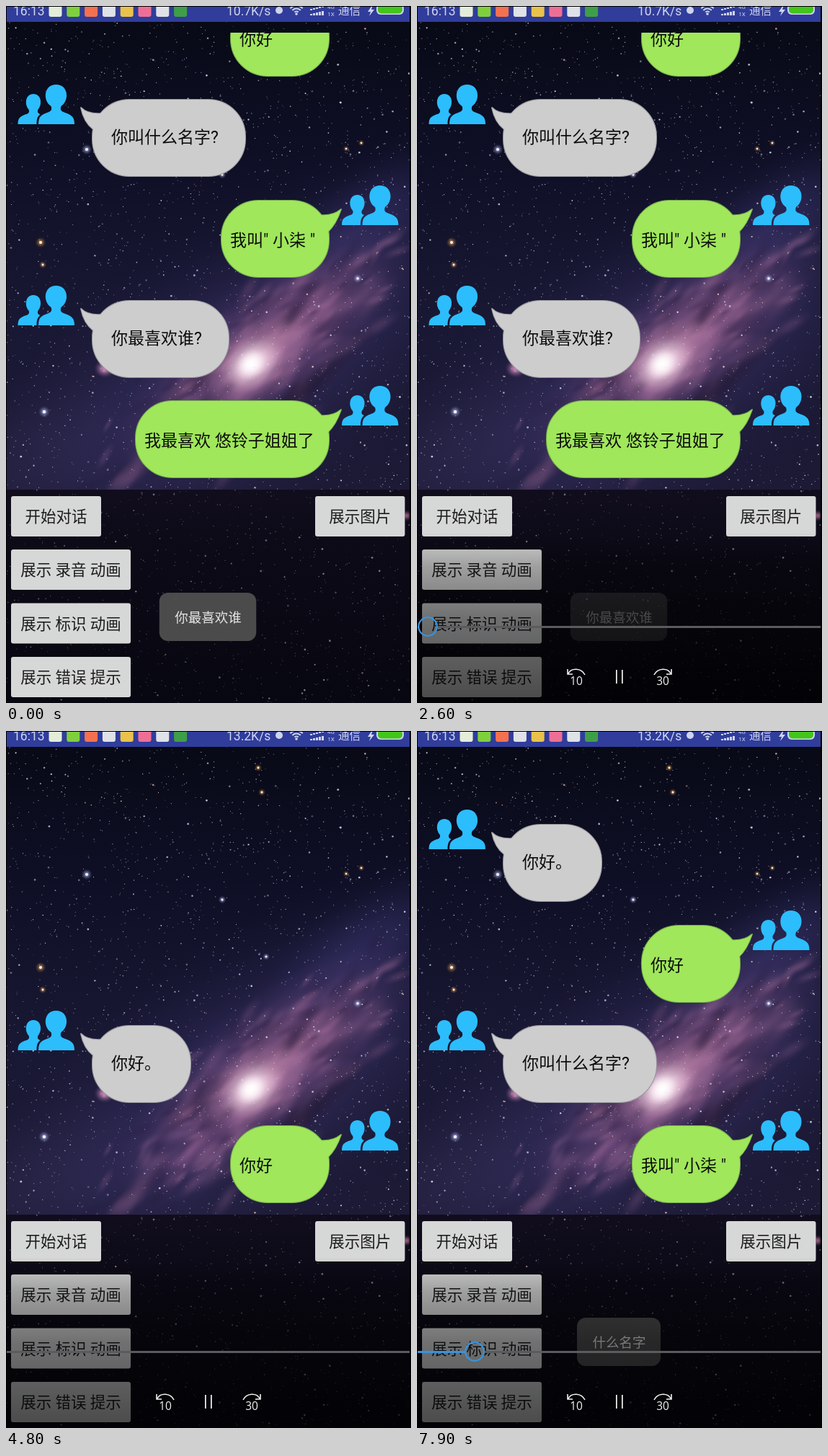
Recreate the animation shown at these times as an HTML page with a canvas. Size 562 px wide and 967 px high, loop 8 s.

```html
<!DOCTYPE html>
<html lang="zh">
<head>
<meta charset="utf-8">
<style>
html, body { margin: 0; width: 100%; height: 100%; overflow: hidden; background: #000; }
canvas { display: block; width: 100vw; height: 100vh; }
</style>
</head>
<body>
<canvas id="stage" width="562" height="967"></canvas>
<script>
const W = 562, H = 967, LOOP = 8000, ROW = 139.25;
const FONT = 'Roboto, "Noto Sans CJK SC", "Noto Sans CJK", sans-serif';
const BLUE = '#3793de', SKY = '#2cbdfd';
const stage = document.getElementById('stage').getContext('2d');
let c = stage;

const clamp = v => Math.max(0, Math.min(1, v));
const ramp = (t, from, to) => clamp((t - from) / (to - from));

function rect(x, y, w, h, color) { c.fillStyle = color; c.fillRect(x, y, w, h); }
function box(x, y, w, h, r, color) {
  c.fillStyle = color; c.beginPath(); c.roundRect(x, y, w, h, r); c.fill();
}
function dot(x, y, r, color, ry = r) {
  c.fillStyle = color; c.beginPath(); c.ellipse(x, y, r, ry, 0, 0, 7); c.fill();
}
function text(s, x, y, size, color, align = 'center', font = FONT) {
  c.font = size + 'px ' + font; c.textAlign = align; c.textBaseline = 'alphabetic';
  c.fillStyle = color; c.fillText(s, x, y + size * 0.37);
}
function linear(y0, y1, stops) {
  const g = c.createLinearGradient(0, y0, 0, y1);
  stops.forEach(([at, color]) => g.addColorStop(at, color));
  return g;
}
function glow(x, y, rx, ry, angle, rgb, alpha) {
  c.save();
  c.translate(x, y); c.rotate(angle * Math.PI / 180); c.scale(rx, ry);
  const g = c.createRadialGradient(0, 0, 0, 0, 0, 1);
  [[0, 1], [.3, .75], [.6, .32], [.82, .09], [1, 0]]
    .forEach(([at, k]) => g.addColorStop(at, `rgba(${rgb},${alpha * k})`));
  c.fillStyle = g; c.fillRect(-1, -1, 2, 2);
  c.restore();
}

function paintSky() {
  let seed = 41;
  const rnd = () => (seed = seed * 16807 % 2147483647) / 2147483647;
  const spread = () => rnd() + rnd() + rnd() - 1.5;

  rect(0, 0, W, H, linear(0, 671, [[0, '#080914'], [.3, '#0e0f25'], [.65, '#191834'], [1, '#1c1a35']]));
  glow(330, 500, 520, 200, -35, '70,60,125', .55);
  glow(60, 610, 220, 110, -20, '66,58,105', .2);
  glow(490, 310, 200, 80, -38, '73,67,140', .35);
  glow(360, 478, 260, 100, -39, '158,98,145', .7);
  glow(425, 420, 120, 50, -42, '150,95,135', .3);
  // Dust and clouds scattered along the galactic disc.
  for (let i = 0; i < 260; i++) {
    const along = spread() * 230, across = spread() * 75, slope = -39 * Math.PI / 180;
    const x = 350 + along * Math.cos(slope) - across * Math.sin(slope);
    const y = 488 + along * Math.sin(slope) + across * Math.cos(slope);
    const r = 8 + rnd() * 20;
    glow(x, y, r * 1.8, r * .6, -39 + spread() * 25, rnd() < .5 ? '30,20,50' : '190,125,170', .2);
  }
  glow(400, 545, 180, 24, -41, '25,18,40', .6);
  glow(280, 570, 125, 18, -38, '115,72,130', .35);
  glow(344, 492, 95, 55, -40, '215,155,190', .75);
  glow(341, 496, 50, 36, -38, '255,238,246', 1);
  glow(340, 497, 24, 20, -38, '255,255,255', 1);

  rect(0, 671, W, H - 671, linear(671, H, [[0, '#110d1d'], [.3, '#0b0a16'], [1, '#070711']]));
  for (let i = 0; i < 3000; i++) {
    const x = rnd() * W, y = 22 + rnd() * 945, size = rnd() ** 8, low = y > 671 ? .6 : 1;
    const tint = rnd() < .15 ? '255,205,190' : '215,218,245';
    dot(x, y, .55 + size * .9, `rgba(${tint},${low * (.25 + rnd() * .7)})`);
  }
  const bright = [[112, 199, 2.6], [53, 563, 2.8], [300, 234, 1.9], [361, 313, 1.7], [488, 378, 2.2]];
  const amber = [[48, 328, 2.6], [51, 359, 1.8], [350, 51, 1.8], [355, 85, 1.8], [493, 190, 1.5], [472, 198, 1.5]];
  const star = rgb => ([x, y, r]) => { glow(x, y, r * 3, r * 3, 0, rgb, .7); dot(x, y, r * .8, '#f4efff'); };
  bright.forEach(star('190,200,255'));
  amber.forEach(star('240,160,60'));
  glow(137, 503, 15, 13, 0, '230,150,200', .9);
  glow(556, 707, 8, 8, 0, '210,130,170', .7);
}

const sky = document.createElement('canvas');
sky.width = W; sky.height = H;
c = sky.getContext('2d'); paintSky(); c = stage;

function statusBar(speed) {
  const ink = '#cfd4ee', sans = 'Roboto, sans-serif';
  rect(0, 0, W, 22, '#303d9b');
  text('16:13', 10, 7, 17.5, ink, 'left', sans);
  ['#e4edd8', '#7fd03c', '#f4714f', '#dfe2e6', '#eac24b', '#ee6f95', '#dfe2e6', '#3f9f48']
    .forEach((color, i) => box(59.5 + i * 24.8, -4, 18, 19, 3, color));
  text(speed, 306, 6.5, 17.5, ink, 'left', sans);
  dot(379, 6, 5, ink);
  c.strokeStyle = ink; c.lineWidth = 2;
  [3.5, 7.5, 11.5].forEach(r => {
    c.beginPath(); c.arc(403, 11, r, -Math.PI * .77, -Math.PI * .23); c.stroke();
  });
  dot(403, 11, 1.8, ink);
  for (let i = 0; i < 5; i++) {
    rect(422 + i * 4, 11 - i, 3, 2 + i, ink);
    rect(422 + i * 4, 4 - i, 3, 2, ink);
  }
  text('4G', 451, 1, 8, ink, 'center', sans);
  text('1X', 451, 11, 8, ink, 'center', sans);
  text('通信', 461, 6, 15.5, ink, 'left');
  c.fillStyle = ink; c.fill(new Path2D('M508 -1 L502 8 H506 L504 14 L511 5 H507 L509 -1Z'));
  box(514, -3, 38, 15, 6, ink);
  box(516, -2, 34, 12.5, 5, '#43c51c');
}

const PERSON = new Path2D(
  'M0 55 C0 46 3 44 12 41 C16 39.5 16 37 15 34.5 C9 28 10 13 21.5 13 C33 13 34 28 28 34.5 ' +
  'C27 37 27 39.5 31 41 C26.5 45 26 49 26 55Z ' +
  'M28.5 55 C28.5 44 32 42 43 38 C47.5 36 47 33 46 30 C34 22 36 0 53 0 C70 0 72 22 60 30 ' +
  'C59 33 58.5 36 63 38 C74 42 78.5 44 78.5 55Z');

function avatar(x, y) {
  c.save(); c.translate(x, y); c.fillStyle = SKY; c.fill(PERSON); c.restore();
}

// Coordinates are relative to the top left corner of the bubble body.
function bubble(width, mine) {
  const body = new Path2D();
  body.roundRect(1, 1, width - 2, 106, 51);
  const tail = new Path2D(mine
    ? `M${width - 14} 21 Q${width + 4} 23 ${width + 16} 13 Q${width + 9} 34 ${width - 3} 45Z`
    : 'M15 20 Q-5 22 -15 12 Q-11 32 2 42Z');
  c.lineWidth = 2; c.lineJoin = 'round';
  c.strokeStyle = mine ? '#75a94e' : '#96969c';
  c.fillStyle = mine ? '#a0e75b' : '#cdcdcd';
  c.stroke(body); c.stroke(tail);
  c.fill(body); c.fill(tail);
}

const MESSAGES = [
  ['你好。', 138], ['你好', 138], ['你叫什么名字?', 214],
  ['我叫" 小柒 "', 151], ['你最喜欢谁?', 191], ['我最喜欢 悠铃子姐姐了', 270]
];

function chat(count) {
  c.save();
  c.beginPath(); c.rect(0, 37, W, 634); c.clip();
  MESSAGES.slice(0, count).forEach(([words, width], i) => {
    const mine = i % 2 === 1, left = mine ? 449 - width : 119;
    const top = Math.round(547 - (count - 1 - i) * ROW);
    avatar(mine ? 466 : 16.5, top - 20);
    c.save(); c.translate(left, top); bubble(width, mine); c.restore();
    text(words, left + (mine ? 13 : 27), top + (mine ? 55 : 52), 23, '#0c0c0c', 'left');
  });
  c.restore();
}

function buttons() {
  [['开始对话', 7, 680, 125], ['展示图片', 429, 680, 124.5], ['展示 录音 动画', 7, 754, 166],
   ['展示 标识 动画', 7, 828.5, 166], ['展示 错误 提示', 7, 903, 166]].forEach(([label, x, y, w]) => {
    box(x, y + 1, w, 56, 3, 'rgba(0,0,0,.5)');
    box(x, y, w, 56, 3, '#d6d7d7');
    text(label, x + w / 2, y + 28.5, 21.5, '#1c1c1c');
  });
}

function toast(words, width, alpha) {
  c.globalAlpha = alpha;
  box(280 - width / 2, 814, width, 67, 12, 'rgba(80,80,80,.93)');
  text(words, 280.5, 848, 18.5, '#e4e4e4');
  c.globalAlpha = 1;
}

function microphone(alpha) {
  const tint = '#5cc4e2';
  c.globalAlpha = alpha;
  c.lineWidth = 2;
  c.strokeStyle = linear(725, 925, [[0, tint], [.5, 'rgba(70,165,200,.6)'], [.75, 'rgba(50,110,170,0)']]);
  for (let r = 20; r <= 100; r += 20) { c.beginPath(); c.arc(280, 825, r, 0, 7); c.stroke(); }
  box(264, 825, 33, 57, 16, tint);
  c.strokeStyle = tint; c.lineWidth = 8;
  c.beginPath(); c.moveTo(253, 856); c.lineTo(253, 864);
  c.arc(280, 864, 27, Math.PI, 0, true); c.lineTo(307, 856); c.stroke();
  rect(276, 894, 8, 14, tint);
  dot(280.5, 912, 19.5, tint, 6);
  c.globalAlpha = 1;
}

function skip(x, label, side) {
  c.save();
  c.translate(x, 931); c.scale(side, 1);
  c.strokeStyle = '#f2f2f2'; c.lineWidth = 1.6;
  c.stroke(new Path2D('M-11 -5 C-7 -13 7 -13 12 -3 M-12 -11 V-4 H-5'));
  c.restore();
  text(label, x, 936, 15.5, '#f2f2f2', 'center', '"Open Sans", sans-serif');
}

function controls(knob, alpha) {
  c.globalAlpha = alpha;
  rect(0, 730, W, 237, linear(730, H, [[0, 'rgba(0,0,0,0)'], [.2, 'rgba(0,0,0,.26)'],
    [.5, 'rgba(0,0,0,.48)'], [1, 'rgba(0,0,0,.66)']]));
  if (knob > 13) rect(0, 860, knob - 13, 3, BLUE);
  const start = Math.max(0, knob + 13);
  rect(start, 860, W - start, 3, '#5b5b5f');
  c.strokeStyle = BLUE; c.lineWidth = 2.2;
  c.beginPath(); c.arc(knob, 861, 12.8, 0, 7); c.stroke();
  skip(221, '10', 1);
  skip(341, '30', -1);
  rect(276, 921, 1.7, 19, '#f2f2f2');
  rect(284, 921, 1.7, 19, '#f2f2f2');
  c.globalAlpha = 1;
}

const KNOB_STEPS = [
  [0, 479], [1500, 493], [2400, 15], [2800, 22], [3100, 37], [3400, 52], [3600, 67], [3900, 80],
  [4100, 96], [4400, 112], [4600, 125], [4800, -40], [6300, -7], [6600, 8], [6900, 22],
  [7100, 37], [7400, 52], [7700, 67], [7900, 80]
];

function knobAt(t) {
  if (t >= 1500 && t < 2400) return 493 - 478 * ramp(t, 1500, 2400);
  return KNOB_STEPS.filter(([at]) => at <= t).pop()[1];
}

function draw(t) {
  const first = t < 2800;
  const replay = t >= 4800 ? t - 4000 : t;
  const asked = replay >= 3100;
  const count = first ? 6 : asked ? 4 : 2;

  c.drawImage(sky, 0, 0);
  statusBar(first ? '10.7K/s' : '13.2K/s');
  chat(count);
  buttons();
  if (first) toast('你最喜欢谁', 134.5, 1 - .5 * ramp(t, 1400, 2600));
  else if (asked) toast('什么名字', 116, ramp(replay, 3300, 3700));
  else microphone(t >= 4800 ? ramp(t, 5400, 5900) : 1);

  const visible = ramp(t, 900, 1300);
  if (visible) controls(knobAt(t), visible);
  rect(0, 0, W, 1, '#000');
  rect(0, 0, 1, H, '#000');
  rect(560, 0, 2, H, '#000');
}

function tick(now) {
  draw(Math.floor(now % LOOP / 100) * 100);
  requestAnimationFrame(tick);
}
requestAnimationFrame(tick);
</script>
</body>
</html>
```
